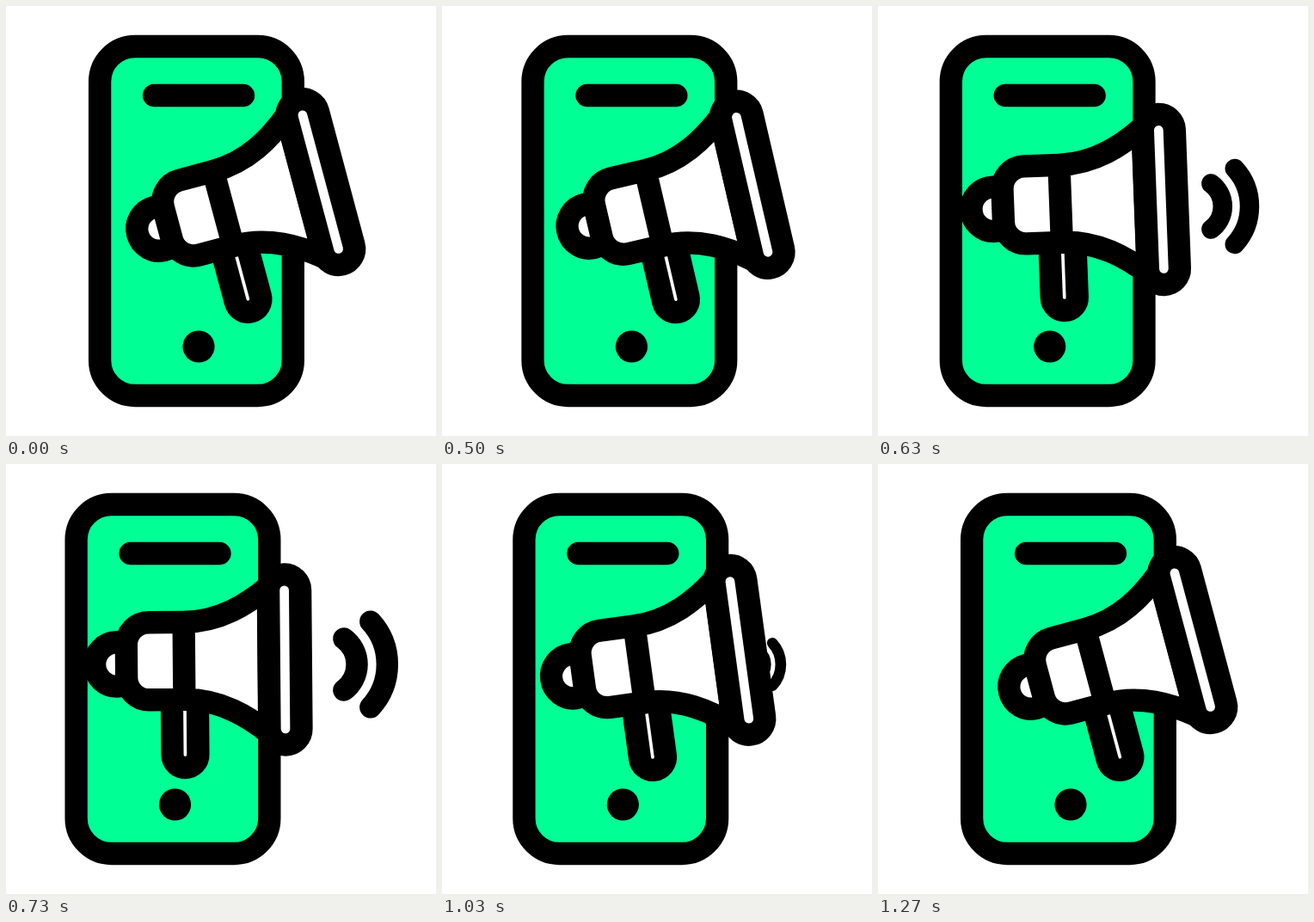
An HTML page that plays this animation: 500 by 500 pixels, repeating every 1370 ms.

```html
<!DOCTYPE html>
<html lang="en">
<head>
<meta charset="utf-8">
<title>Phone and megaphone</title>
<style>
  html, body { margin: 0; width: 100%; height: 100%; overflow: hidden; background: #fff; }
  svg { display: block; width: 100%; height: 100%; }
</style>
</head>
<body>
<svg viewBox="0 0 500 500" fill="#fff" stroke="#000" stroke-width="26.3" stroke-linecap="round" stroke-linejoin="round">
  <g id="phone">
    <rect x="80.7" y="47" width="224.7" height="406" rx="41" fill="#00ff94"/>
    <path d="M143.6 104H247.6"/>
    <circle cx="195.6" cy="396" r="18.6" fill="#000" stroke="none"/>
  </g>
  <g id="waves" fill="none">
    <path d="M394.5 202A38.5 38.5 0 0 1 394.5 264"/>
    <path d="M426.5 181.5A76 76 0 0 1 426.5 284.5"/>
  </g>
  <g id="horn">
    <circle cx="127.3" cy="232" r="25.7"/>
    <rect x="191" y="230" width="30" height="122.8" rx="15"/>
    <path d="M205.5 183.6H164.5a26 26 0 0 0 -26 26V247.6a26 26 0 0 0 26 26H205.5C248 273.6 280 294.2 304 313.7V143.5C280 163 248 183.6 205.5 183.6V273.6"/>
    <rect x="304.3" y="129" width="37" height="198.2" rx="18.5"/>
  </g>
</svg>
<script>
const LOOP = 1370;
const [phone, waves, horn] = ['phone', 'waves', 'horn'].map(id => document.getElementById(id));

// Cubic ease with handles (a, 0) and (b, 1), solved by bisection.
function ease(t, a, b) {
  if (t <= 0) return 0;
  if (t >= 1) return 1;
  let lo = 0, hi = 1, s;
  for (let i = 0; i < 24; i++) {
    s = (lo + hi) / 2;
    const r = 1 - s;
    const x = 3 * s * r * r * a + 3 * s * s * r * b + s * s * s;
    if (x < t) lo = s; else hi = s;
  }
  return s * s * (3 - 2 * s);
}

// 1 = tilted and silent, 0 = level and sounding.
function tiltAt(ms) {
  return ms < 867
    ? 1 - ease((ms - 333) / 534, 0.74, 0.05)
    : ease((ms - 867) / 400, 0.333, 0.4);
}

function draw(now) {
  const tilt = tiltAt(now % LOOP);
  const shift = 28.4 * tilt;
  const size = 1 - tilt;
  phone.setAttribute('transform', `translate(${shift})`);
  horn.setAttribute('transform', `translate(${shift}) rotate(${-15 * tilt} 241 161)`);
  waves.setAttribute('transform', `translate(345 233) scale(${size}) translate(-345 -233)`);
  waves.setAttribute('visibility', size > 0.001 ? 'visible' : 'hidden');
}

const start = performance.now();
function tick() {
  draw(performance.now() - start);
  requestAnimationFrame(tick);
}
tick();
</script>
</body>
</html>
```
